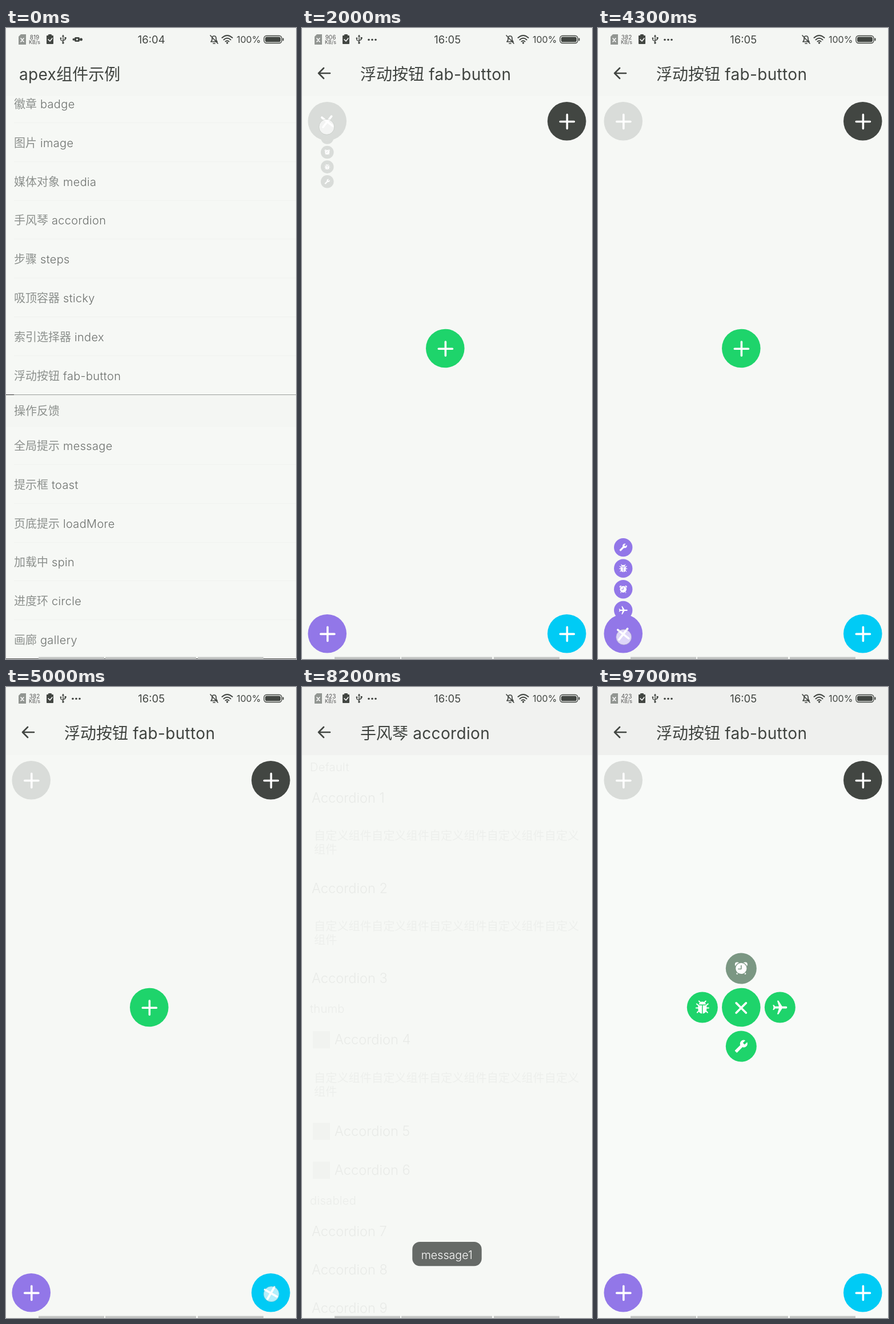
An HTML page that plays this animation: 508x1102 px, repeating every 10000 ms.

```html
<!DOCTYPE html>
<html lang="zh-CN">
<head>
<meta charset="utf-8">
<title>fab-button</title>
<style>
html, body { margin: 0; width: 100%; height: 100%; overflow: hidden; background: #f6f8f5; }
svg { display: block; }
text { font-family: Inter, "Noto Sans CJK SC", "Noto Sans CJK", sans-serif; white-space: pre; }
.title { font-size: 28px; fill: #404440; font-weight: 400; }
.row { font-size: 20px; fill: #8c908d; font-weight: 300; }
.head { font-size: 23.6px; fill: #555956; font-weight: 300; }
.title .latin { letter-spacing: .012em; }
.row .latin { letter-spacing: .017em; fill: #6c706d; }
.line { fill: none; stroke-linecap: round; stroke-linejoin: round; }
</style>
</head>
<body>
<svg id="stage" width="508" height="1102" viewBox="0 0 508 1102"></svg>
<script>
const INK = '#424642';
const latin = (s) => s.replace(/[ -~]+/g, '<tspan class="latin">$&</tspan>');
const text = (x, y, s, cls, extra = '') => `<text x="${x}" y="${y}" class="${cls}" ${extra}>${cls ? latin(s) : s}</text>`;
const rect = (x, y, w, h, fill, extra = '') => `<rect x="${x}" y="${y}" width="${w}" height="${h}" fill="${fill}" ${extra}/>`;
const disc = (x, y, r, fill, extra = '') => `<circle cx="${x}" cy="${y}" r="${r}" fill="${fill}" ${extra}/>`;
const line = (d, color, w) => `<path class="line" d="${d}" stroke="${color}" stroke-width="${w}"/>`;
const group = (id, body, extra = '') => `<g id="${id}" ${extra}>${body}</g>`;

// Page shells
const shell = (cls) => rect(0, 0, 508, 1102, '#f6f8f5', `class="${cls}-body"`) +
  rect(0, 0, 508, 119, '#f4f6f3', `class="${cls}-bar"`);
const backBar = (title) => line('M49 79H29M38 70L29 79L38 88', INK, 2.7) + text(102, 91, title, 'title');

// List page
const itemsA = ['徽章 badge', '图片 image', '媒体对象 media', '手风琴 accordion',
  '步骤 steps', '吸顶容器 sticky', '索引选择器 index', '浮动按钮 fab-button'];
const itemsB = ['全局提示 message', '提示框 toast', '页底提示 loadMore', '加载中 spin',
  '进度环 circle', '画廊 gallery'];
const rows = (items, y0) => items.map((s, i) => {
  const y = y0 + i * 67.8;
  const rule = i < items.length - 1 ? rect(14, Math.round(y + 32), 494, 1, '#f0f2ef') : '';
  return text(14, y + 7, s, 'row') + rule;
}).join('');
const listPage = shell('list') + text(23, 91, 'apex组件示例', 'title') + rows(itemsA, 133) +
  rect(0, 641, 508, 56, '#f4f6f3') + rect(0, 640, 508, 1, '#9b9e9b') + rect(0, 640, 14, 1, '#333') +
  text(14, 676, '操作反馈', 'row') + rows(itemsB, 730);

// Floating button menus
const icons = {
  airplane: () => '<path fill="#fff" transform="rotate(90) scale(1.25) translate(-11.5 -12)" d="M21 16v-2l-8-5V3.5a1.5 1.5 0 0 0-3 0V9l-8 5v2l8-2.5V19l-2 1.5V22l3.5-1 3.5 1v-1.5L13 19v-5.5z"/>',
  alarm: (bg) => line('M-5 6L-7 9M5 6L7 9', '#fff', 3) + disc(-7, -7, 4, '#fff') + disc(7, -7, 4, '#fff') +
    disc(0, 0, 10.8, bg) + disc(0, 0, 9.6, '#fff') + line('M0 -5V1H-5', bg, 1.6),
  bug: (bg) => line('M-11 1H11M-10 -6L-6 -3M10 -6L6 -3M-9 9L-5 5M9 9L5 5M-4 -9L-6 -11M4 -9L6 -11', '#fff', 2) +
    '<path fill="#fff" d="M-6 -5A6 5 0 0 1 6 -5ZM-7.5 -3.5H7.5V3A7.5 8 0 0 1 -7.5 3Z"/>' + line('M0 -3V11', bg, 1.5),
  wrench: () => '<path fill="#fff" transform="scale(-1 1) translate(-12 -12)" d="M22.7 19l-9.1-9.1c.9-2.3.4-5-1.5-6.9-2-2-5-2.4-7.4-1.3L9 6 6 9 1.6 4.7C.4 7.1.9 10.1 2.9 12.1c1.9 1.9 4.6 2.4 6.9 1.5l9.1 9.1c.4.4 1 .4 1.4 0l2.3-2.3c.5-.4.5-1.1.1-1.4z"/>'
};
const kinds = Object.keys(icons);
const labels = [['airplane', 110], ['alarm', 85], ['bugfill', 105], ['build', 85]];
const ring = [[68, 0], [0, -68], [-68, 0], [0, 68]];
const along = (dx, dy) => kinds.map((_, i) => [dx * (68 + 61 * i), dy * (68 + 61 * i)]);

// runs: [open, end of close, first angle]; tap: height of the finger below the centre
const menus = [
  { x: 44.2, y: 162.8, tap: 10, color: '#d9dcd9', spots: along(0, 1), named: true, runs: [[1400, 2100, 12]] },
  { x: 463.8, y: 162.8, tap: 9, color: INK, spots: along(-1, 0), runs: [[2400, 3000, 12]] },
  { x: 250.8, y: 559.5, tap: 9, color: '#1ed46b', spots: ring, dim: '#7b9783', runs: [[3300, 4000, 10], [5900, 1e5, 12]] },
  { x: 44.2, y: 1057.7, tap: 6, color: '#9277e8', spots: along(0, -1), named: true, runs: [[4200, 4800, 12]] },
  { x: 463.8, y: 1057.7, tap: 2.5, color: '#00cbf5', spots: along(-1, 0), runs: [[5000, 5700, 30]] }
];

function menuMarkup(m, i) {
  const subs = m.spots.map(([x, y], k) => {
    const fill = k === 1 && m.dim || m.color;
    return `<g transform="translate(${x} ${y})">${disc(0, 0, 27, fill)}${icons[kinds[k]](fill)}</g>`;
  }).join('');
  const tags = !m.named ? '' : m.spots.map(([, y], k) => {
    const [name, w] = labels[k];
    return rect(41, y - 18, w, 36, '#e1e4e1', 'rx="3"') +
      text(41 + w / 2, y + 6, name, 'row', 'text-anchor="middle" style="font-size:18px"');
  }).join('');
  return `<g transform="translate(${m.x} ${m.y})">` + group('subs' + i, subs) + group('tags' + i, tags) +
    disc(0, 0, 33.8, m.color) + group('plus' + i, line('M-11.5 .7H12.7M.6 -11.4V12.8', '#fff', 3.6)) + '</g>';
}
const fabPage = shell('fab') + backBar('浮动按钮 fab-button') + menus.map(menuMarkup).join('');

// Accordion page
const entry = (y, n, thumb) => (thumb ? rect(19, y - 14, 30, 30, '#bcbfbc') : '') +
  text(thumb ? 57 : 17, y + 9, 'Accordion ' + n, 'head');
const chevron = (y) => line(`M466 ${y - 3}l6 6l6 -6`, '#8a8e8b', 1.8);
const note = (y) => text(21, y + 7, '自定义组件'.repeat(4) + '自定义', 'row', 'style="font-size:20.2px"') +
  text(21, y + 31, '组件', 'row', 'style="font-size:20.2px"');
const accordionBody = text(14, 147, 'Default', 'row') + entry(193, 1) + note(260) + entry(351, 2) + note(418) +
  entry(508, 3) + text(14, 569, 'thumb', 'row') + entry(615, 4, true) + note(683) + entry(775, 5, true) +
  entry(843, 6, true) + text(14, 904, 'disabled', 'row') + entry(950, 7) + entry(1017, 8) + entry(1084, 9);
const chevrons = [193, 351, 508, 615, 775, 843, 950, 1017, 1084].map(chevron).join('');
const accordionPage = shell('acc') + disc(39, 80, 27, '#e3e5e2', 'id="ripple"') +
  backBar('手风琴 accordion') + group('accBody', accordionBody) + group('chevrons', chevrons);

// Status bar and bottom edge
const small = (id, y, s, size) => text(50, y, s, '', `id="${id}" text-anchor="middle" fill="#555" style="font-size:${size}px"`);
const status =
  '<path fill="#929692" d="M26 11H35V29H22V15Z"/>' + line('M26 18l5 6M31 18l-5 6', '#fff', 1.6) +
  small('speed', 19.5, '819', 10) + small('unit', 28, 'KB/s', 9) +
  rect(71, 13, 12, 15, INK, 'rx="1"') + rect(74, 11, 6, 4, INK, 'rx="1"') + line('M74 20l3 3l4 -5', '#fff', 1.5) +
  line('M100 14V26M96 18V21L100 23.5M104 17V20L100 22', INK, 1.4) + disc(100, 26, 1.8, INK) +
  '<path fill="#424642" d="M97.8 15L100 11.5L102.2 15Z"/>' + disc(96, 18, 1.4, INK) + rect(102.6, 16, 3, 3, INK) +
  group('gear', rect(120, 16, 9, 8, INK, 'rx="2"') + disc(118.5, 20, 2, INK) + disc(131.5, 20, 2.5, INK) + disc(124.5, 20, 1.6, '#f4f6f3')) +
  group('dots', [117, 123, 129].map(x => disc(x, 20.5, 1.8, INK)).join('')) +
  text(254.7, 27, '16:04', '', `id="clock" text-anchor="middle" fill="${INK}" style="font-size:18.5px"`) +
  line('M359 24H370L368 21V18Q368 14 364.5 14Q361 14 361 18V21ZM363 27H366M358 13L371 27', INK, 1.7) +
  line('M378.5 17Q387.5 9 396.5 17M381.5 20.5Q387.5 15 393.5 20.5M384.5 23.5Q387.5 21 390.5 23.5', INK, 2) + disc(387.5, 26, 1.7, INK) +
  text(404, 26, '100%', '', `fill="${INK}" style="font-size:16px"`) +
  rect(452, 13.5, 31, 13, 'none', `rx="4.5" stroke="${INK}" stroke-width="1.4"`) + rect(454, 15.5, 27, 9, INK, 'rx="2.8"') +
  rect(484.5, 17.5, 2, 5, INK, 'rx="1"');
const edge = rect(0, 1101, 508, 1, '#555', 'id="edge"') +
  [[57, 115], [174, 159], [336, 115]].map(([x, w]) => rect(x, 1098.5, w, 3.5, '#c3c5c3')).join('');
const toast = rect(193.3, 969, 121.4, 42.3, '#666a67', 'rx="13"') +
  text(253.7, 998.5, 'message1', '', 'text-anchor="middle" fill="#fff" style="font-size:19.7px;font-weight:300"');

document.getElementById('stage').innerHTML =
  group('list', listPage) + group('fab', fabPage) + group('acc', accordionPage) +
  group('toast', toast) + disc(0, 0, 13.5, '#fff', 'id="touch" opacity=".7" stroke="#aab0aa" stroke-width=".6"') +
  status + edge;

const $ = (id) => document.getElementById(id);
const fade = (el, o) => el.setAttribute('opacity', o);
const move = (id, x) => $(id).setAttribute('transform', `translate(${x} 0)`);
const at = (list, t, t0) => t < t0 ? 0 : list[Math.min((t - t0) / 100, list.length - 1)];
const latest = (list, t) => list.filter(([t0]) => t0 <= t).pop()[1];
const SLIDE = [0.31, 0.85, 1];
const speeds = [[0, 819], [800, 906], [2700, 382], [5500, 373], [8100, 423]];

// [from, until, x, y]
const touches = [[100, 200, 250, 613], [6500, 6700, 319, 566], [7800, 8000, 252, 634]];
for (const m of menus) for (const [open, shut] of m.runs) {
  touches.push([open, open + 200, m.x + 1, m.y + m.tap]);
  if (shut < 1e4) touches.push([shut - 200, shut, m.x - 1, m.y + m.tap]);
}

function pose(m, t) {
  const run = m.runs.find(([open, shut]) => t >= open && t < shut);
  if (!run) return [0, 0, 0];
  const [open, shut, first] = run;
  if (t >= shut - 200) return [at([0.8, 0.42], t, shut - 200), at([45, 38], t, shut - 200), 0];
  return [at([0, 0.6, 1], t, open), at([first, 38, 45], t, open), at([0, 0, 0.5, 1], t, open)];
}

function draw(t) {
  const p = at(SLIDE, t, 500);
  const q = t < 9200 ? at(SLIDE, t, 8000) : at([0.526, 0.1, 0], t, 9200);
  move('list', -127 * p);
  move('fab', 508 * (1 - p) - 127 * q);
  move('acc', 508 * (1 - q));

  menus.forEach((m, i) => {
    const [scale, angle, tag] = pose(m, t);
    $('subs' + i).setAttribute('transform', `scale(${scale})`);
    $('plus' + i).setAttribute('transform', `rotate(${angle})`);
    fade($('tags' + i), tag);
  });

  const late = t >= 9200;
  document.querySelector('.fab-body').setAttribute('fill', late ? '#f8faf8' : '#f6f8f5');
  document.querySelector('.fab-bar').setAttribute('fill', late ? '#eff0ee' : '#f4f6f3');
  document.querySelector('.acc-bar').setAttribute('fill', '#f1f2f0');
  const shown = at([0.4, 0.75, 1], t, 8300);
  fade($('accBody'), Math.max(0.08, shown));
  fade($('chevrons'), shown);
  fade($('ripple'), t >= 9100 ? 1 : 0);
  fade($('toast'), t < 8400 ? at([0.3, 0.7, 1], t, 6600) : at([0.5, 0], t, 8400));

  const hit = touches.find(([a, b]) => t >= a && t < b);
  fade($('touch'), hit ? 0.7 : 0);
  if (hit) $('touch').setAttribute('transform', `translate(${hit[2]} ${hit[3]})`);

  $('speed').textContent = latest(speeds, t);
  $('clock').textContent = t < 500 ? '16:04' : '16:05';
  fade($('gear'), t < 100 ? 1 : 0);
  fade($('dots'), t < 100 ? 0 : 1);
  fade($('edge'), t < 500 ? 1 : 0);
}

const start = performance.now();
function tick() {
  draw(Math.floor((performance.now() - start) % 10000 / 100) * 100);
  requestAnimationFrame(tick);
}
tick();
</script>
</body>
</html>
```
